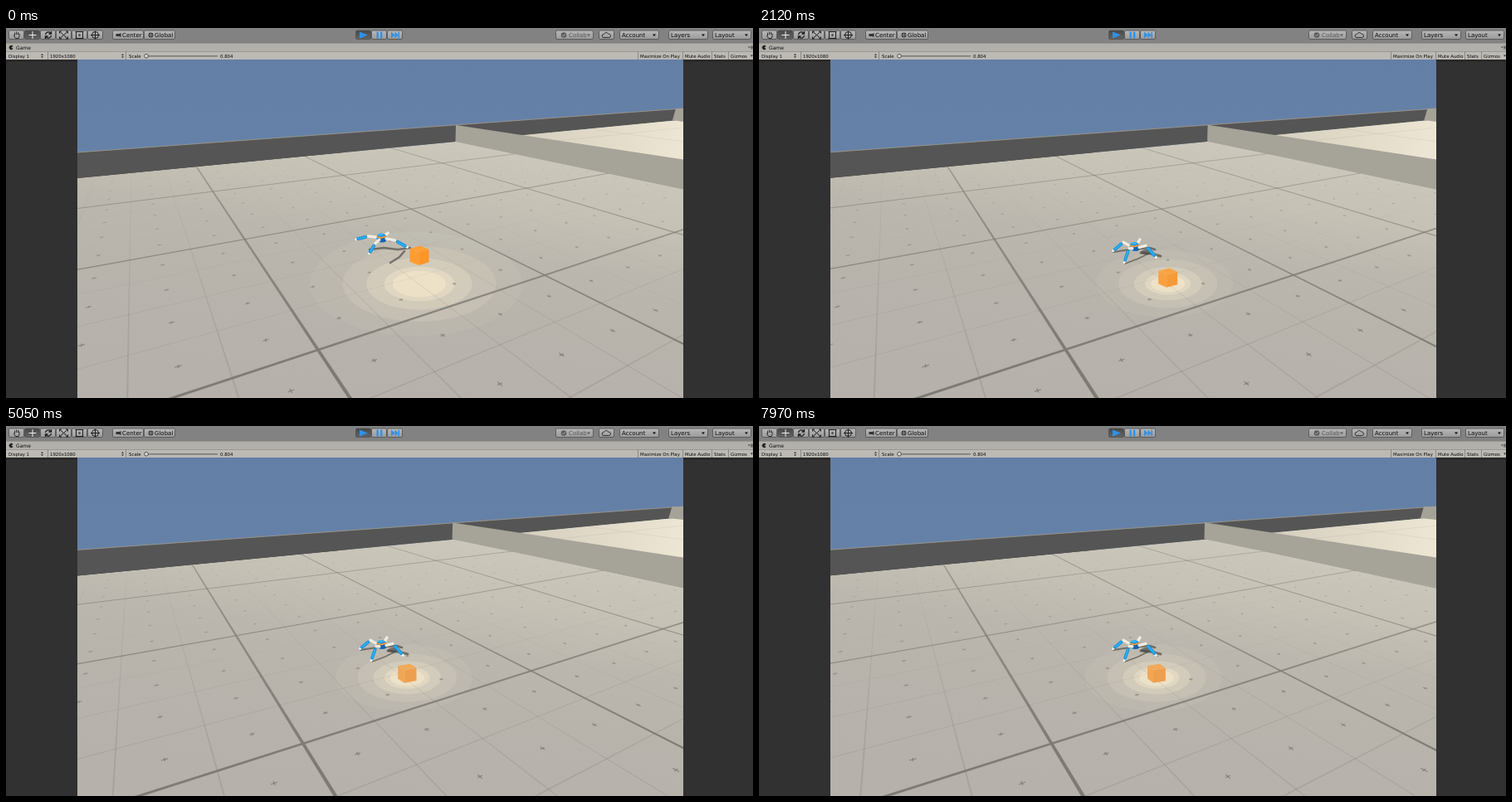
An HTML page with a canvas for the animation above (8 s loop, 900 by 446 pixels).

```html
<!DOCTYPE html>
<html lang="en">
<head>
<meta charset="utf-8">
<title>Game view</title>
<style>
html, body { margin: 0; width: 100%; height: 100%; overflow: hidden; background: #313131; }
canvas, svg { position: absolute; left: 0; top: 0; width: 900px; height: 446px; }
text { font-family: "DejaVu Sans", sans-serif; fill: #0c0c0c; }
</style>
</head>
<body>
<canvas id="view" width="900" height="446"></canvas>
<svg id="bar" viewBox="0 0 900 446">
  <defs>
    <linearGradient id="btn" x2="0" y2="1"><stop stop-color="#b8b8b8"/><stop offset="1" stop-color="#9a9a9a"/></linearGradient>
    <linearGradient id="on" x2="0" y2="1"><stop stop-color="#484848"/><stop offset="1" stop-color="#646464"/></linearGradient>
  </defs>
  <rect width="900" height="18" fill="#828282"/>
  <rect y="18" width="900" height="10" fill="#b2b0aa"/>
  <rect y="28" width="900" height="10" fill="#bcbab3"/>
  <path d="M0 18.5H900M0 28.5H900" stroke="#8c8a85" stroke-width=".7"/>
  <path d="M0 39.500H86M816 39.500H900" stroke="#292929" stroke-width="3"/>
  <g id="ui"></g>
  <g fill="none" stroke="#1d1d1d">
    <path d="M9.500 8.500l1 3 1.500 1h3l1-2.500V6.500M10.500 9V5.500M12.500 8V4.500M14.500 8V5" stroke-width=".9"/>
    <path d="M27.500 8.500h9M32 4v9" stroke="#eee"/>
    <path d="M47.500 8a3.500 3.500 0 0 1 6-2M54.500 9a3.500 3.500 0 0 1-6 2M54.500 4v3h-3M47.500 13v-3h3" stroke-width="1.400"/>
    <path d="M65 4.500l9 8M74 4.500l-9 8M64.500 6.500v-2.500h2.500M72 4h2.500v2.500M74.500 10.500v2.500H72M67 13h-2.500v-2.500"/>
    <path d="M84.500 4.500h8v8h-8zM83.500 4.500h2M91.500 4.500h2M83.500 12.500h2M91.500 12.500h2"/>
    <circle cx="88.500" cy="8.500" r=".8"/>
    <circle cx="107.500" cy="8.500" r="4"/><path d="M102 8.500h11M107.500 3.500v10"/>
  </g>
  <path d="M132.500 7h4l2-1v5l-2-1h-4z" fill="#333"/>
  <circle cx="174.500" cy="8.500" r="3" fill="#3b3b3b"/><path d="M172 8.500h5M174.500 6v5" stroke="#aaa" stroke-width=".6"/>
  <path d="M426 4.500l10 4-10 4zM446.500 4.500h2.300v8h-2.300zM451 4.500h2.300v8h-2.300zM464 4.500l4.500 4v-4l4 4v-4h1.500v8h-1.500v-4l-4 4v-4l-4.500 4z" fill="#2f91ea"/>
  <circle cx="672" cy="8.500" r="3.300" fill="#5c5c5c"/><path d="M670.300 8.500l1.300 1.400 2.200-2.800" stroke="#aaa" fill="none"/>
  <path d="M720 11.500a2 2 0 0 1 .3-4 3 3 0 0 1 5.500-.3 2.200 2.200 0 0 1 1 4.300z" fill="none" stroke="#333"/>
  <path d="M8.500 22a2.600 2.600 0 1 0 0 3l-2-1.500z" fill="#222"/>
  <path d="M171 33.800H255" stroke="#6c6a66" stroke-width="1.200"/><circle cx="169" cy="33.800" r="2.300" fill="#ddd" stroke="#333" stroke-width=".8"/>
  <path d="M50.500 28.500v9.500M144.500 28.500v9.500M761.500 28.500v9.500M815.500 28.500v9.500M850.500 28.500v9.500M870.500 28.500v9.500" stroke="#77756f" stroke-width=".7"/>
  <path d="M42 33l1.500-2 1.500 2zM42 34.200l1.500 2 1.500-2zM139 33l1.500-2 1.500 2zM139 34.200l1.500 2 1.500-2zM897 32.500h3l-1.500 2.200zM894 22.500h2.500l-1.200 1.800z" fill="#333"/>
  <path d="M897 22h3M897 23.500h3M897 25h3" stroke="#333" stroke-width=".7"/>
</svg>
<script>
const ui = document.getElementById("ui");
const svg = (tag, attrs, label) => {
  const el = document.createElementNS("http://www.w3.org/2000/svg", tag);
  for (const k in attrs) el.setAttribute(k, attrs[k]);
  if (label) el.textContent = label;
  ui.append(el);
};
const button = (x, w, on) => svg("rect", {
  x: x + .5, y: 3, width: w - 1, height: 10.5, rx: 1.5,
  fill: `url(#${on ? "on" : "btn"})`, stroke: "#505050", "stroke-width": .8
});
const label = (x, y, size, s, fill) => svg("text", { x, y, "font-size": size, style: fill ? `fill:${fill}` : "" }, s);
// button with a caption and a drop-down arrow
const menu = (x, w, s, ink = "#0c0c0c", inset = 3) => {
  button(x, w);
  label(x + inset, 11, 7, s, ink);
  svg("path", { d: `M${x + w - 8} 7.500h4l-2 2.500z`, fill: ink });
};

for (let i = 0; i < 6; i++) button(3 + i * 19, 19, i === 1);
for (let i = 0; i < 3; i++) button(421 + i * 19, 19, i === 0);
button(128, 38);
button(166, 38);
button(714, 19);
label(140, 11, 7, "Center");
label(179, 11, 7, "Global");
menu(662, 46, "Collab", "#5a5a5a", 16);
menu(739, 48, "Account");
menu(798, 48, "Layers");
menu(851, 47, "Layout");
label(12, 25.7, 6, "Game");
[[3, "Display 1"], [53, "1920x1080"], [148, "Scale"], [258, "0.804"], [764, "Maximize On Play"],
 [818, "Mute Audio"], [853, "Stats"], [873, "Gizmos"]].forEach(([x, s]) => label(x, 35.8, 5.4, s));

const g = document.getElementById("view").getContext("2d");
const LOOP = 8000;
const VU = [1383, 56], VV = [153, 52];   // vanishing points of the floor grid
const KU = .372, KV = .658;              // perspective step per tile
const FALL = [150, 480];

// sideways camera drift: time, share of the way
const drift = [[670, 0], [2120, .28], [5050, .77], [7110, .83], [7970, 1]];

const clamp = k => Math.max(0, Math.min(1, k));
const span = (t, a, b) => clamp((t - a) / (b - a));
const mix = (a, b, k) => a + (b - a) * k;
const along = (keys, t) => keys.reduce((v, [at, to], i) =>
  i ? v + (to - keys[i - 1][1]) * span(t, keys[i - 1][0], at) : to, 0);

function poly(color, ...p) {
  g.beginPath();
  for (let i = 0; i < p.length; i += 2) g.lineTo(p[i], p[i + 1]);
  g.closePath();
  g.fillStyle = color;
  g.fill();
}
function line(color, width, ...p) {
  g.beginPath();
  for (let i = 0; i < p.length; i += 2) g.lineTo(p[i], p[i + 1]);
  g.strokeStyle = color;
  g.lineWidth = width;
  g.stroke();
}
function oval(color, x, y, rx, ry) {
  g.beginPath();
  g.ellipse(x, y, rx, ry, 0, 0, 7);
  g.fillStyle = color;
  g.fill();
}
function ramp(x0, y0, x1, y1, ...colors) {
  const r = g.createLinearGradient(x0, y0, x1, y1);
  colors.forEach((c, i) => r.addColorStop(i / (colors.length - 1), c));
  return r;
}
// ink that fades out towards the horizon
const fade = (rgb, far, near) => ramp(0, 140, 0, 400, `rgba(${rgb},${far})`, `rgba(${rgb},${near})`);

function floorGrid(px, py) {
  const near = (py - VV[1]) / (388 - VV[1]);
  const spot = (u, v) => {
    const s = KU * near * u, r = KV * near * v, w = 1 + s + r;
    return w > .06 ? [(px + s * VU[0] + r * VV[0]) / w, (py + s * VU[1] + r * VV[1]) / w] : null;
  };
  const bold = fade("124,122,115", .5, 1), thin = fade("118,115,108", .05, .24), dots = fade("105,102,96", 0, .55);
  const ray = (van, a, b, heavy) => {
    if (!a || !b) return;
    const out = p => van.map((c, i) => c + 8 * (p[i] - c));
    poly(heavy ? bold : thin, ...van, ...out(a), ...out(b));
    if (!heavy) return;
    g.strokeStyle = bold;
    g.lineWidth = .3;
    g.stroke();
  };
  for (let n = -10; n <= 26; n++) {
    const q = n / 4, heavy = n % 4 === 0, h = heavy ? .0045 : .002;
    ray(VV, spot(q - h, 0), spot(q + h, 0), heavy);
    if (n > -5 && n < 12) ray(VU, spot(0, q - h), spot(0, q + h), heavy);
  }
  for (let i = -8; i < 20; i++) for (let j = -4; j < 11; j++) {
    const u = i / 4 + .125, v = j / 4 + .125, d = .009;
    const ends = [spot(u - d, v), spot(u + d, v), spot(u, v - d), spot(u, v + d)];
    if (ends.includes(null)) continue;
    line(dots, 1.3, ...ends[0], ...ends[1]);
    line(dots, 1.3, ...ends[2], ...ends[3]);
  }
}

function glow(x, y, size) {
  for (let i = 0; i < 5; i++) {
    const r = size * (20 + 60 * ((4 - i) / 4) ** 1.6);
    oval(`rgba(255,240,208,${.05 + .085 * i})`, x - (i ? 0 : 4), y, r, r * .49);
  }
}

function box(x, y, yaw, worn) {
  const p = [0, 1, 2, 3].map(i => {
    const a = (yaw + i * 90) * Math.PI / 180;
    return [x + 11.6 * Math.cos(a), y + 3.9 * Math.sin(a)];
  });
  const up = q => [q[0], q[1] - 15.5];
  const tone = (r, gr, b) => `rgb(${r - 14 * worn},${gr + 10 * worn},${b + 38 * worn})`;
  p.forEach((a, i) => {
    const b = p[(i + 1) % 4];
    if (a[1] + b[1] > 2 * y) poly(a[0] + b[0] < 2 * x ? tone(255, 156, 48) : tone(252, 149, 40), ...a, ...b, ...up(b), ...up(a));
  });
  poly(tone(255, 159, 52), ...p.flatMap(up));
}

// four legs at right angles; knees and feet lie on flattened rings around the body
function robot(land) {
  const bx = 452.5, by = mix(253, 263.5, land);
  const ring = (deg, r, dy) => {
    const a = deg * Math.PI / 180;
    return [bx + r * Math.cos(a), by + dy + .42 * r * Math.sin(a)];
  };
  const shade = "rgba(76,74,70,.68)";
  g.lineCap = "round";
  g.globalAlpha = 1 - land;
  line(shade, 2.4, 438, 267, 455, 265, 472, 267, 487, 265);
  line(shade, 2.4, 463, 283, 474, 276, 480, 269);
  g.globalAlpha = land;
  line(shade, 1.8, 427, 270, 447, 267);
  line(shade, 1.8, 441, 284, 457, 278, 469, 272);
  line(shade, 2.6, 457, 266, 471, 265, 477, 267);
  line(shade, 3, 460, 271, 472, 272, 484, 275);
  oval(shade, 467, 270, 7, 3);
  g.globalAlpha = 1;

  const leg = (deg, whole = true) => {
    const hip = ring(deg, 6, 0);
    const knee = ring(deg, mix(17, 14.3, land), mix(.5, -3.2, land));
    const foot = ring(deg, mix(33, 27.5, land), mix(6.5, 9, land));
    const shin = k => knee.map((c, i) => mix(c, foot[i], k));
    line("#f0ece2", 3.4, ...hip, ...knee);
    if (!whole) return;
    line("#f5f3ec", 2.8, ...shin(.7), ...foot);
    line("#178fd8", 3.9, ...shin(.22), ...shin(.82));
    line("#2bb0f5", 2, ...shin(.22), ...shin(.8));
  };
  leg(297, false);
  leg(200);
  oval("#1f8fdc", bx, by, 6, 5.6);
  oval("#1b62ac", bx + 1.5, by + 2.7, 4, 2.6);
  line("#f29a35", 1.8, bx - 5, by - 1, bx, by - .2, bx + 5, by - 1.6);
  oval("#37b6f8", bx - 1, by - 4, 3.4, 1.6);
  leg(20);
  leg(117);
  g.lineCap = "butt";
}

function draw(t) {
  const go = along(drift, t), shift = 23.5 * go;
  const rise = 5.2 * span(t, 2000, 3800);
  const land = span(t, ...FALL), fall = land ** 1.5;
  const lift = go * .8;
  const corner = 542 - 5 * go, right = 807 - 6 * go;
  const base = x => 181 - lift - .0965 * (x - 86);
  const top = x => 150 - lift * (816 - x) / 730 - .0726 * (x - 86);
  const boxX = 498 - .81 * shift;
  const boxY = mix(282, 304, fall) + 5 * span(t, 670, 2120) - .6 * rise;

  g.fillStyle = "#313131";
  g.fillRect(0, 0, 900, 446);
  g.save();
  g.beginPath();
  g.rect(86, 38, 730, 408);
  g.clip();

  g.fillStyle = ramp(0, 38, 0, 150, "#647fa6", "#6681a8");
  g.fillRect(86, 38, 730, 112);

  g.save();
  g.beginPath();
  g.moveTo(86, base(86));
  g.lineTo(816, base(816));
  g.lineTo(816, 446);
  g.lineTo(86, 446);
  g.clip();
  g.fillStyle = ramp(500, 135, 455, 446, "#cbc7ba", "#c5c1b5", "#bbb7ae", "#b8b4ac", "#b7b2ab", "#b6b1aa");
  g.fillRect(86, 90, 730, 356);
  glow(boxX, 308.5 - rise, mix(1.6, 1.03, fall));
  floorGrid(376 - shift, 388 - rise);
  g.restore();

  // back wall, far room, dividing wall
  poly("#555", 86, top(86), 816, top(816), 816, base(816), 86, base(86));
  line("#a49d88", .8, 86, top(86), 816, top(816));
  poly(ramp(624, 129, 816, 150, "#d6cfbf", "#eee6d4"), 600, base(600), 816, base(816), 816, 170, 600, 150);
  line("rgba(150,142,125,.2)", .7, 665, 136, 816, 120);
  line("rgba(150,142,125,.2)", .7, 700, 121, 816, 137);
  poly("#a5a298", right, 97.3, 816, 97, 816, 113, right - 4, 111);
  poly("#a6a399", corner, 117 - lift, 816, 158.5, 816, 194.5, corner - .5, 137 - lift);

  robot(land);
  box(boxX, boxY, 93 + 17 * go, span(t, 700, 3800));
  g.restore();
}

function tick() {
  draw(performance.now() % LOOP);
  requestAnimationFrame(tick);
}
tick();
</script>
</body>
</html>
```
